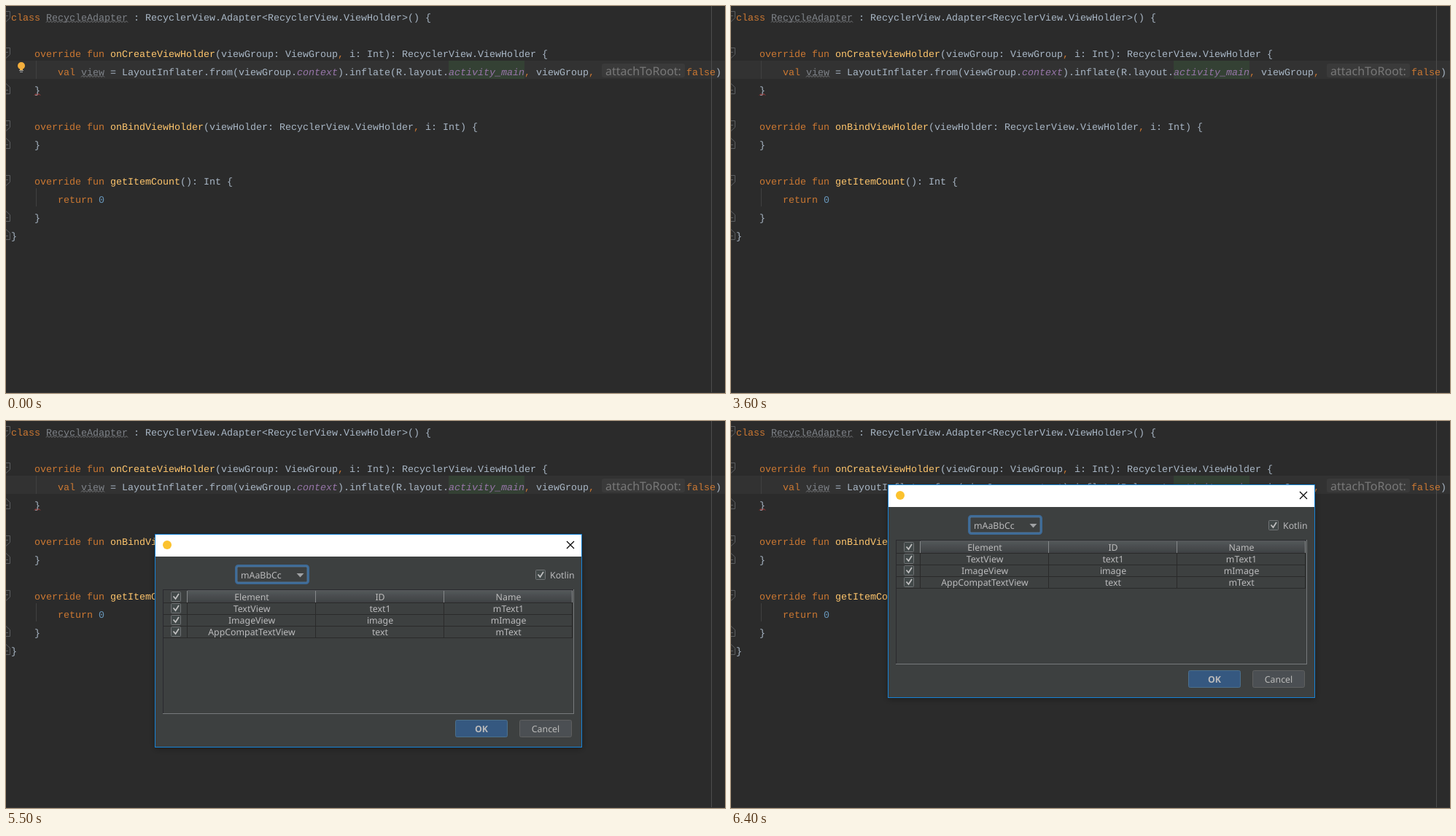
Recreate the animation shown at these times as an HTML page. Size 986 px wide and 531 px high, loop 8 s.

```html
<!DOCTYPE html>
<html lang="en">
<head>
<meta charset="utf-8">
<title>Code generation demo</title>
<style>
  html, body { margin: 0; width: 100%; height: 100%; overflow: hidden; background: #2b2b2b; }
  svg { display: block; width: 986px; height: 531px; }
  text { white-space: pre; text-rendering: geometricPrecision; font-variant-ligatures: none; }
  .code { font: 13.33px "Liberation Mono", monospace; fill: #a9b7c6; }
  .ui { font-family: "Noto Sans", "Open Sans", sans-serif; font-size: 12.35px; fill: #bbb; }
  .keyword { fill: #cc7832; }
  .func { fill: #ffc66d; }
  .field { fill: #9876aa; font-style: italic; }
  .weak { fill: #7e8288; }
  .number { fill: #6897bb; }
</style>
</head>
<body>
<svg id="stage" viewBox="0 0 986 531"></svg>
<script>
const LOOP = 8000;
const stage = document.getElementById('stage');

const escapeText = s => s.replace(/&/g, '&amp;').replace(/</g, '&lt;');
const rect = (x, y, w, h, fill, extra = '') =>
  `<rect x="${x}" y="${y}" width="${w}" height="${h}" fill="${fill}" ${extra}/>`;
const frame = (x, y, w, h, fill, stroke, radius = 0) =>
  rect(x + .5, y + .5, w - 1, h - 1, fill, `stroke="${stroke}" rx="${radius}"`);
const path = (d, stroke, width = 1, fill = 'none') =>
  `<path d="${d}" fill="${fill}" stroke="${stroke}" stroke-width="${width}"/>`;
const label = (x, y, s, anchor = 'start', extra = '') =>
  `<text class="ui" x="${x}" y="${y}" text-anchor="${anchor}" ${extra}>${escapeText(s)}</text>`;

// ---------- editor ----------
const codeLines = [
  'class RecycleAdapter : RecyclerView.Adapter<RecyclerView.ViewHolder>() {',
  '',
  '    override fun onCreateViewHolder(viewGroup: ViewGroup, i: Int): RecyclerView.ViewHolder {',
  '        val view = LayoutInflater.from(viewGroup.context).inflate(R.layout.activity_main, viewGroup,',
  '    }',
  '',
  '    override fun onBindViewHolder(viewHolder: RecyclerView.ViewHolder, i: Int) {',
  '    }',
  '',
  '    override fun getItemCount(): Int {',
  '        return 0',
  '    }',
  '}'
];
const tokens = new RegExp([
  '(?<keyword>\\b(?:class|override|fun|val|return|false)\\b|,)',
  '(?<func>(?<=fun )\\w+)',
  '(?<field>\\b(?:context|activity_main)\\b)',
  '(?<weak>\\b(?:RecycleAdapter|view)\\b)',
  '(?<number>\\b\\d\\b)'
].join('|'), 'g');

const highlight = line => escapeText(line).replace(tokens, (match, ...args) => {
  const groups = args[args.length - 1];
  const kind = Object.keys(groups).find(k => groups[k]);
  return `<tspan class="${kind}">${match}</tspan>`;
});
const lineCenter = i => 15 + 25 * i;
const codeText = (x, i, s) =>
  `<text class="code" x="${x}" y="${lineCenter(i) + 5}">${highlight(s)}</text>`;

function wave(x1, x2, y, color) {
  let d = `M${x1} ${y + 2}`;
  for (let x = x1 + 2, up = true; x <= x2; x += 2, up = !up) d += `L${x} ${up ? y : y + 2}`;
  return path(d, color);
}

function foldMark(line, opens) {
  const y = lineCenter(line) - (opens ? 7.5 : 8.5), color = '#5c5e60';
  return opens
    ? path(`M0 ${y}H5.5V${y + 9}L0 ${y + 14}M0 ${y + 6}H3`, color)
    : path(`M0 ${y}L5.5 ${y + 5}V${y + 14}H0M0 ${y + 9}H3`, color);
}

const editor =
  rect(0, 0, 986, 531, '#2b2b2b') +
  rect(0, 75, 986, 25, '#323232') +
  rect(607, 75, 104, 25, '#344134') +
  rect(967, 0, 1, 531, '#4d4d4d') +
  rect(0, 530, 986, 1, '#353637') +
  rect(41, 75, 1, 25, '#404040') + rect(41, 250, 1, 25, '#404040') +
  [0, 2, 6, 9].map(i => foldMark(i, true)).join('') +
  [4, 7, 11, 12].map(i => foldMark(i, false)).join('') +
  codeLines.map((s, i) => codeText(7, i, s)).join('') +
  rect(817, 79, 114, 19, '#3a3a3a', 'rx="3"') +
  label(822, 94.5, 'attachToRoot:', 'start', 'style="font-size:16px;fill:#787878"') +
  codeText(933, 3, 'false)') +
  wave(55, 167, 20.5, '#77797c') +
  wave(103, 135, 95.5, '#77797c') +
  wave(39, 47, 120.5, '#bc3f3c');

const bulb =
  '<circle cx="21" cy="82" r="5" fill="#f4af3d"/>' + rect(19, 86, 4, 2, '#f4af3d') +
  rect(18, 88, 6, 1, '#9a9da0') + rect(19, 90, 4, 1, '#9a9da0');

// ---------- popup menu ----------
const menuItems = [
  [135, 'FindViewById'],
  [158, 'Secondary Constructor'], [178, 'equals() and hashCode()'], [198, 'toString()'],
  [221, 'Override Methods...', 'Ctrl+O'], [241, 'Implement Methods...', 'Ctrl+I'],
  [261, 'Test...'], [281, 'Copyright'],
  [301, 'Json2Bean', 'Alt+J'], [321, 'FindViewById', 'Ctrl+U']
];
const menu =
  frame(670, 99, 219, 234, '#3c3f41', '#606365') +
  rect(671, 100, 217, 23, '#45494b') + rect(671, 123, 217, 1, '#56595b') +
  label(781.5, 116, 'Generate', 'middle') +
  rect(671, 146, 217, 1, '#515456') + rect(671, 209, 217, 1, '#56595b') +
  rect(671, 125, 217, 20, '#4b6eaf', 'id="selection"') +
  menuItems.map(([y, name, keys]) =>
    label(698, y + 4, name) + (keys ? label(878, y + 5, keys, 'end') : '')).join('');

// ---------- dialog ----------
const checkBox = (x, y) =>
  frame(x - 7, y - 7, 14, 14, '#43494a', '#707375', 1) +
  path(`M${x - 3.5} ${y - .5}l3 3.5l4.5 -7`, '#c0c0c0', 1.7);

const button = (x, s, fill, stroke, extra) =>
  frame(x, 255, 72, 24, fill, stroke, 2) + label(x + 36, 272, s, 'middle', extra);

function table() {
  const rows = [
    ['Element', 'ID', 'Name'],
    ['TextView', 'text1', 'mText1'],
    ['ImageView', 'image', 'mImage'],
    ['AppCompatTextView', 'text', 'mText']
  ];
  let out = frame(11, 76, 564, 171, '#3c3f41', '#2a2c2d') +
    rect(11, 246, 564, 1, '#777a7c') + rect(574, 76, 1, 171, '#777a7c') +
    rect(45, 77, 528, 17, 'url(#header)');
  for (const x of [44, 220, 396, 572])
    out += rect(x, 78, 1, 16, '#85888a') + rect(x, 94, 1, 49, '#292b2c');
  rows.forEach((cells, i) => {
    const y = 94 + 16 * i;
    out += rect(12, y, 561, 1, '#292b2c') + checkBox(29, y - 8);
    cells.forEach((s, col) => { out += label(133 + 176 * col, y - 3, s, 'middle'); });
  });
  return out;
}

const dialog =
  frame(0, 0, 586, 293, '#3c3f41', '#1883d7') +
  rect(1, 1, 584, 30, '#fff') +
  '<circle cx="17" cy="15" r="6" fill="#fbc22d"/>' +
  path('M565 10l10 10M575 10l-10 10', '#000', 1.2) +
  rect(111.5, 43.5, 99, 24, '#3c3f41', 'stroke="#3d6a96" stroke-width="3" rx="3"') +
  rect(113, 45, 96, 21, 'none', 'stroke="#5781a8" stroke-width=".7"') +
  label(118, 60.5, 'mAaBbCc') +
  path('M194.5 54h10l-5 5.5z', 'none', 0, '#9fa1a3') +
  checkBox(529, 56) + label(542, 61, 'Kotlin') +
  table() +
  button(412, 'OK', '#365880', '#4c708c', 'font-weight="700"') +
  button(500, 'Cancel', '#4c5052', '#5e6060');

stage.innerHTML = `
  <defs>
    <linearGradient id="header" x2="0" y2="1">
      <stop stop-color="#55595b"/><stop offset="1" stop-color="#3e4143"/>
    </linearGradient>
    <filter id="shadow" x="-5%" y="-5%" width="110%" height="115%">
      <feDropShadow dx="0" dy="2" stdDeviation="4" flood-opacity=".3"/>
    </filter>
  </defs>
  ${editor}
  <g id="bulb">${bulb}</g>
  ${rect(670, 75, 2, 25, '#bbb', 'id="caret"')}
  <g id="menu">${menu}</g>
  <g id="dialog" filter="url(#shadow)">${dialog}</g>`;

const [bulbEl, caretEl, menuEl, selectionEl, dialogEl] =
  ['bulb', 'caret', 'menu', 'selection', 'dialog'].map(id => document.getElementById(id));

// ---------- motion ----------
// Each track lists [start time, value...]; the last entry reached is held.
const menuOpacity = [[0, 0], [2100, .5], [2200, .85], [2300, 1], [3600, 0]];
const selectionTop = [[0, 125], [3000, 231], [3100, 291], [3200, 311]];
const dragPath = [
  [5000, -377, -72], [5100, -170, 40], [5200, 40, 130], [5300, 171, 181],
  [5400, 190, 171], [5500, 204, 155], [5600, 214, 139], [5700, 219, 127], [5800, 221, 121],
  [6000, 224, 116], [6100, 220, 103], [6200, 212, 91], [6300, 209, 86], [6400, 215, 87]
];
const held = (track, t) => track.filter(k => k[0] <= t).pop();
const show = (el, on) => { el.style.display = on ? '' : 'none'; };

function render(t) {
  show(bulbEl, t < 700 || (t >= 1400 && t < 2100));
  show(caretEl, t >= 700 && t < 1600);

  const opacity = held(menuOpacity, t)[1];
  show(menuEl, opacity > 0);
  menuEl.setAttribute('opacity', opacity);
  selectionEl.setAttribute('y', held(selectionTop, t)[1]);

  const position = held(dragPath, t);
  show(dialogEl, position);
  if (position) dialogEl.setAttribute('transform', `translate(${position[1]} ${position[2]})`);
}

const start = performance.now();
function tick() {
  render((performance.now() - start) % LOOP);
  requestAnimationFrame(tick);
}
tick();
</script>
</body>
</html>
```
